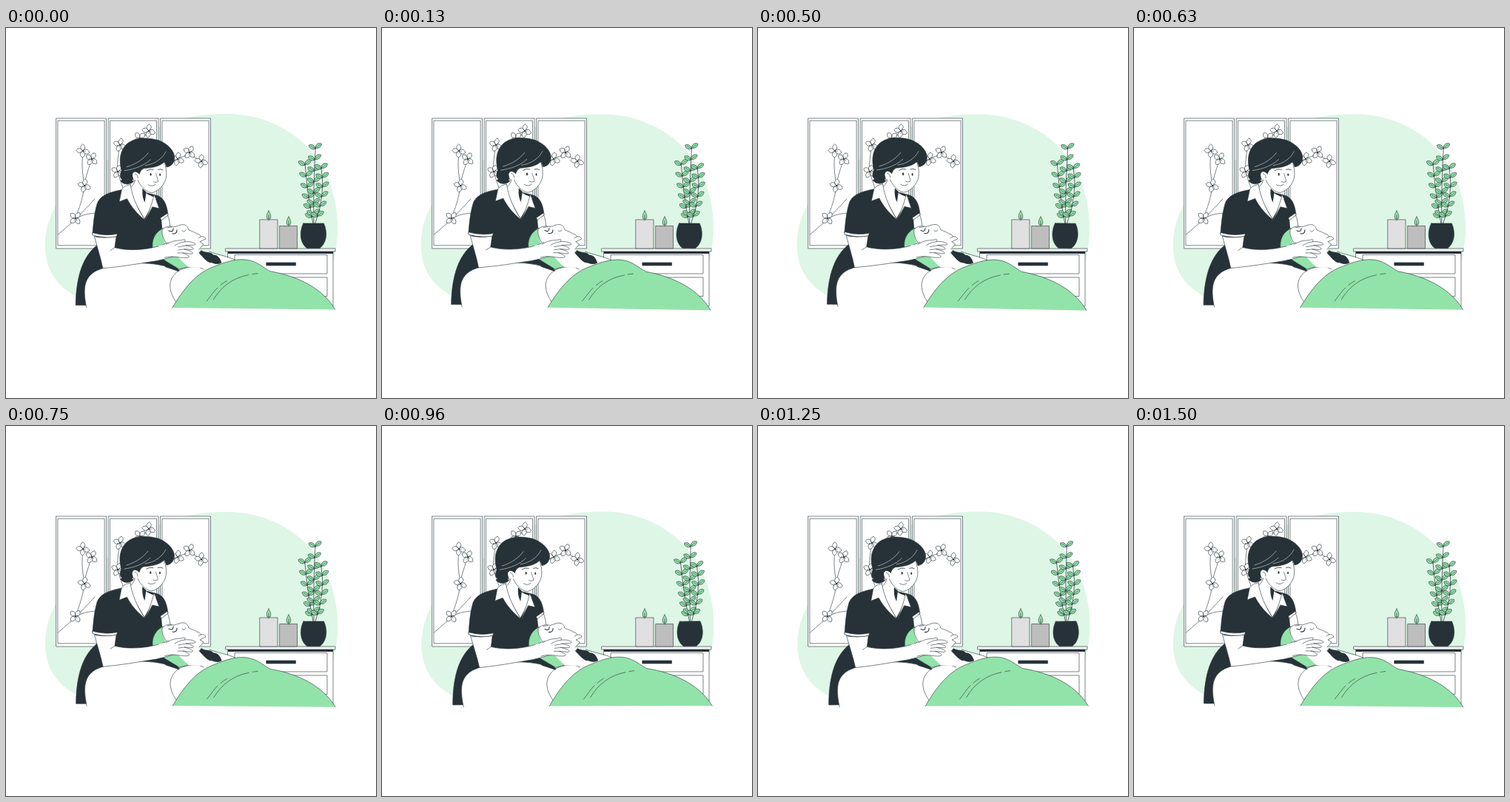
Recreate the animation shown at these times as an HTML page with a canvas. Size 500x500 px, loop 1.54 s.

```html
<!DOCTYPE html>
<html lang="en">
<head>
<meta charset="utf-8">
<title>Spa massage</title>
<style>
html, body { margin: 0; width: 100%; height: 100%; overflow: hidden; background: #fff; }
canvas { display: block; width: 500px; height: 500px; }
</style>
</head>
<body>
<canvas id="stage" width="500" height="500"></canvas>
<script>
const ctx = document.getElementById('stage').getContext('2d');
const INK = '#263238', GREEN = '#92e3a9', MINT = '#def6e5', WHITE = '#fff';
const LOOP = 1540, LEAD = 50;

function shape(d, fill, stroke = INK, width = 0.6) {
  const path = new Path2D(d);
  if (fill) {
    ctx.fillStyle = fill;
    ctx.fill(path);
  }
  if (stroke) {
    ctx.strokeStyle = stroke;
    ctx.lineWidth = width;
    ctx.stroke(path);
  }
}
const line = (d, width = 0.6, color = INK) => shape(d, null, color, width);
const box = (x, y, w, h, fill, stroke) => shape(`M${x} ${y}h${w}v${h}h${-w}Z`, fill, stroke);

function at(x, y, angle, draw) {
  ctx.save();
  ctx.translate(x, y);
  ctx.rotate(angle);
  draw();
  ctx.restore();
}

function sway(cx, cy, angle, draw) {
  at(cx, cy, angle, () => {
    ctx.translate(-cx, -cy);
    draw();
  });
}

function flower(x, y, turn) {
  at(x, y, turn, () => {
    for (const a of [0.35, 1.75, 3.3, 4.75]) {
      at(0, 0, a, () => shape('M0 0C2 -4.5 6 -4.5 9 -1C8 2.5 4 4.5 0 0Z', WHITE));
    }
    for (let i = 0; i < 5; i++) {
      at(0, 0, i * 1.26, () => line('M0 0L3.4 .6', 0.45));
    }
  });
}

function screen() {
  for (const x of [68, 138.5, 209]) {
    box(x, 122, 67.5, 176, WHITE);
    box(x + 2.3, 125.2, 62.8, 168.6, WHITE);
  }
  line('M104 168C102 183 103 197 106 211M115 180C110 194 107 204 106 213C104 230 99 243 94 257');
  line('M70.5 279L89 263C101 251 110 242 120 231M96 257C104 252 111 251 121 250');
  line('M154 160C151 172 151 183 150 193L158 216M193 141C184 147 175 156 168 166');
  line('M212 190C222 183 229 178 236 175C246 170 254 173 264 180M241 173L249 167');
  [[104, 166, 0], [116, 177, 0.5], [106, 213, 0.2], [94, 257, 0.7], [154, 158, 0.3],
    [193, 139, 0.1], [181, 149, 0.8], [151, 194, 0.4], [232, 177, 0.2],
    [248, 168, 0.5], [264, 180, 0.1]].forEach(f => flower(...f));
}

function flame(x, y) {
  shape(`M${x} ${y - 7}C${x + 2} ${y - 3} ${x + 4} ${y} ${x + 2} ${y + 4}H${x - 2}C${x - 4} ${y} ${x - 2} ${y - 3} ${x} ${y - 7}Z`, GREEN);
  line(`M${x} ${y - 1}V${y + 6}`);
}

function dresser() {
  box(300, 302, 142, 74, WHITE);
  box(300, 302, 142, 3, INK, null);
  box(309.5, 306.5, 124.5, 25.5, WHITE);
  box(309.5, 337, 124.5, 25.5, WHITE);
  box(352, 317, 39.5, 4, INK);
  box(297, 298, 148, 4, '#f5f5f5');
  box(343.2, 259, 23.8, 39, '#e0e0e0');
  box(370, 267.5, 23.5, 30.5, '#bdbdbd');
  flame(355, 254);
  flame(382, 262);
}

function leaf(x, y, angle, size) {
  at(x, y, angle, () => {
    shape(`M0 0C${size * 0.25} -4 ${size * 0.8} -3.8 ${size} 0C${size * 0.75} 3.6 ${size * 0.25} 3.3 0 0Z`, GREEN);
    line(`M0 0H${size * 0.75}`, 0.45);
  });
}

// A curved stem carrying evenly spaced opposite leaves.
function sprig([x0, y0], [cx, cy], [x1, y1], pairs) {
  line(`M${x0} ${y0}Q${cx} ${cy} ${x1} ${y1}`, 0.7);
  for (let i = 0; i < pairs; i++) {
    const t = 0.12 + 0.88 * i / (pairs - 1), u = 1 - t;
    const x = u * u * x0 + 2 * u * t * cx + t * t * x1;
    const y = u * u * y0 + 2 * u * t * cy + t * t * y1;
    leaf(x, y, -2.65, 10);
    leaf(x, y - 1, -0.6, 10);
  }
}

function plant() {
  sprig([415, 264], [408, 230], [404, 185], 6);
  sprig([416, 264], [415, 215], [418, 163], 7);
  sprig([418, 264], [432, 225], [426, 190], 6);
  shape('M402 264H429.5C434 274 435 289 424 297.7H407C396 290 397 273 402 264Z', INK);
}

function head() {
  shape('M176 190C176 207 171 213 164 218L187 258L203 230C194 226 188 225 187 219L205 215V180Z', WHITE, null);
  line('M175 203C174 211 170 215 164 219');
  shape('M184.5 217L189.5 222L187.5 236C184 229 184 223 184.5 217Z', INK, null);
  shape('M175 190C176 203 179 211 186 217C190 221 195 224 200 222C208 219 216 209 216.5 200C217 194 216 188 214 182Z', WHITE);
  shape('M172 208C166 213 159 212 154.5 207L157 205C153 203 154 197 156 193C152 178 154 166 163 157C175 147 192 148 206 152C219 157 228 167 227.5 176C227 183 223 187 217 188C216 185 215 183 214 181C207 188 196 189 186 190C182 192 181 195 180 198C175 193 170 196 171 201Z', INK);
  shape('M180 198C175 192 170 195 171 200C172 204 175 207 179 205', WHITE, null);
  line('M174 197C177 198 178 200 178 203');
  shape('M170.4 206a1.2 1.2 0 1 0 2.4 0a1.2 1.2 0 1 0 -2.4 0', WHITE);
  line('M160 193C174 191 187 186 195 178M163 188C176 184 186 177 192 169M188 186C201 184 211 177 216 167', 0.5, WHITE);
  shape('M194.3 198a1.1 1.9 0 1 0 2.2 0a1.1 1.9 0 1 0 -2.2 0M207 198.5a1 1.8 0 1 0 2 0a1 1.8 0 1 0 -2 0', INK, null);
  line('M190 193Q194 190 199 191.5M205.5 191.5Q209 190 212 192', 0.8);
  line('M202.5 197C204 203 206 206 205 208Q202 209.5 199 208M192 212Q197 215.5 202 211.5');
}

function therapistBody() {
  shape('M210 257L218 252C221 259 222 266 222 275L210 278Z', WHITE);
  shape('M166 217C145 221 128 224 123 238C119 252 118 265 117 279L121 281L123 294C105 308 95 334 94.5 375H112L130 335L240 330L205 312L199 287L211 272L209.5 259L219 253C217 236 212 228 202 226Z', INK);
  shape('M208.5 257L218 250.5L219 253L210 260Z', WHITE);
  head();
  shape('M168 212C161 213 157 216 156 220L153 235L163.5 231C169 242 178 252 188 260C179 246 171 231 168 212Z', WHITE);
  shape('M188 260C192 250 197 240 200 225L207 244L198 242Z', WHITE);
}

function therapistArm() {
  shape('M119.5 282Q133 285 149 282L147 297C170 303 201 299 219 290L235 306C222 311 210 313 203 315C177 319 155 323 131 325C128 310 123 296 119.5 282Z', WHITE);
  line('M147 297L141 301');
  shape('M117 277Q134 282 150.5 278.5L149.5 282Q133 285 117.5 280.5Z', WHITE);
}

function patientHead() {
  shape('M264 301C270 305 277 302 280 307C287 307 289 312 291 317C284 321 279 316 276 317C271 319 267 315 261 314Z', INK);
  shape('M205 312C211 309 215 315 219 313C224 313 225 318 228 319C232 321 231 326 234 329L216 323Z', INK);
  shape('M212 271C199 277 195 292 200 303C211 313 221 318 234 326L246 323L228 299Z', GREEN);
  shape('M219 292L262 292L263 306L280 317L262 324L246 323C238 315 230 306 219 298Z', WHITE, null);
  shape('M264 301C270 305 277 302 280 307C287 307 289 312 291 317C284 320 279 316 276 317C270 315 266 309 261 304Z', INK);
  shape('M211 273C214 269 220 267 227 269C232 268 236 265 241 266C245 267 245 270 243 273C248 274 252 274 255 276C258 276 260 278 259 281C265 282 267 286 264 290L262 299L219 299C213 288 210 279 211 273Z', WHITE, null);
  line('M219 294C213 287 210 279 211 273C214 269 220 267 227 269C232 268 236 265 241 266C245 267 246 270 247 273C252 275 255 276 258 278C262 279 264 281 265 284');
  line('M220 274Q226 277 226 271M225 278Q231 279 231 273', 1.1);
  line('M218 270L224 269M238 274Q241 277 243 273');
  shape('M260 284C265 280 269 282 270 285L262 289L267 292L261 299', WHITE);
}

function hand() {
  shape('M215 294C222 288 230 287 237 287C241 285 244 286 241 289C249 288 255 290 256 292C256 294 249 293 243 294C250 295 254 297 253 299C251 300 246 299 241 299C249 301 254 303 252 305C249 306 244 304 239 304C244 306 249 308 247 310C242 312 232 309 224 309C219 309 213 311 208 312Z', WHITE);
  line('M241 289C235 290 231 292 228 294M243 294L233 296M241 299L233 300M239 304L232 304');
  shape('M207 294L217 293L214 312L203 314Z', WHITE, null);
}

function bed() {
  shape('M233 328C270 310 286 311 310 314L340 378H109Z', WHITE, null);
  shape('M109 378C103 350 107 336 123 328C150 316 203 313 232 328L236 378Z', WHITE, null);
  line('M109 378C103 350 107 336 123 328C150 316 203 313 232 328');
  shape('M246 323C251 322 258 322 266 325L281 306C290 307 301 310 311 314L280 365L232 373C222 360 219 347 225 337C228 332 232 328 238 326Z', WHITE, null);
  line('M232 373C222 360 219 347 225 337C229 330 236 325 247 323.5C255 322 262 323 267 326M275 302C287 307 300 308 311 314');
}

function sheet() {
  const edge = 'M225 378C240 353 255 334 276 324.5C290 319 307 311 325 313C340 315 348 324 357 328.5C395 335 429 352 445 380';
  shape(edge + 'Z', GREEN, null);
  line(edge);
  line('M271.5 369C277 362 281 356 286 351M290 347.5Q294 344 298.5 341.5M280.5 367C291 349 308 337 328 333.5M333 332.5L340 331.5');
}

function people() {
  therapistBody();
  bed();
  patientHead();
  therapistArm();
  hand();
  sheet();
}

function blob() {
  shape('M298 116C355 116 408 146 432 196C449 232 452 274 444 308C435 350 395 366 330 368C250 372 140 384 95 363C65 347 53 322 53 295C53 262 66 232 95 212C140 185 180 116 298 116Z', MINT, null);
}

// Linear swing: 0 at the start, 1 at a quarter, -1 at three quarters.
function swing(phase) {
  return 1 - 4 * Math.abs(((phase + 0.25) % 1) - 0.5);
}

function render(now) {
  const angle = swing(((now + LEAD) % LOOP) / LOOP) * Math.PI / 180;
  ctx.fillStyle = WHITE;
  ctx.fillRect(0, 0, 500, 500);
  ctx.lineJoin = ctx.lineCap = 'round';
  sway(250, 249, angle, blob);
  screen();
  dresser();
  sway(416, 227, angle, plant);
  sway(270, 265, angle, people);
}

const start = performance.now();
function tick() {
  render(performance.now() - start);
  requestAnimationFrame(tick);
}
tick();
</script>
</body>
</html>
```
